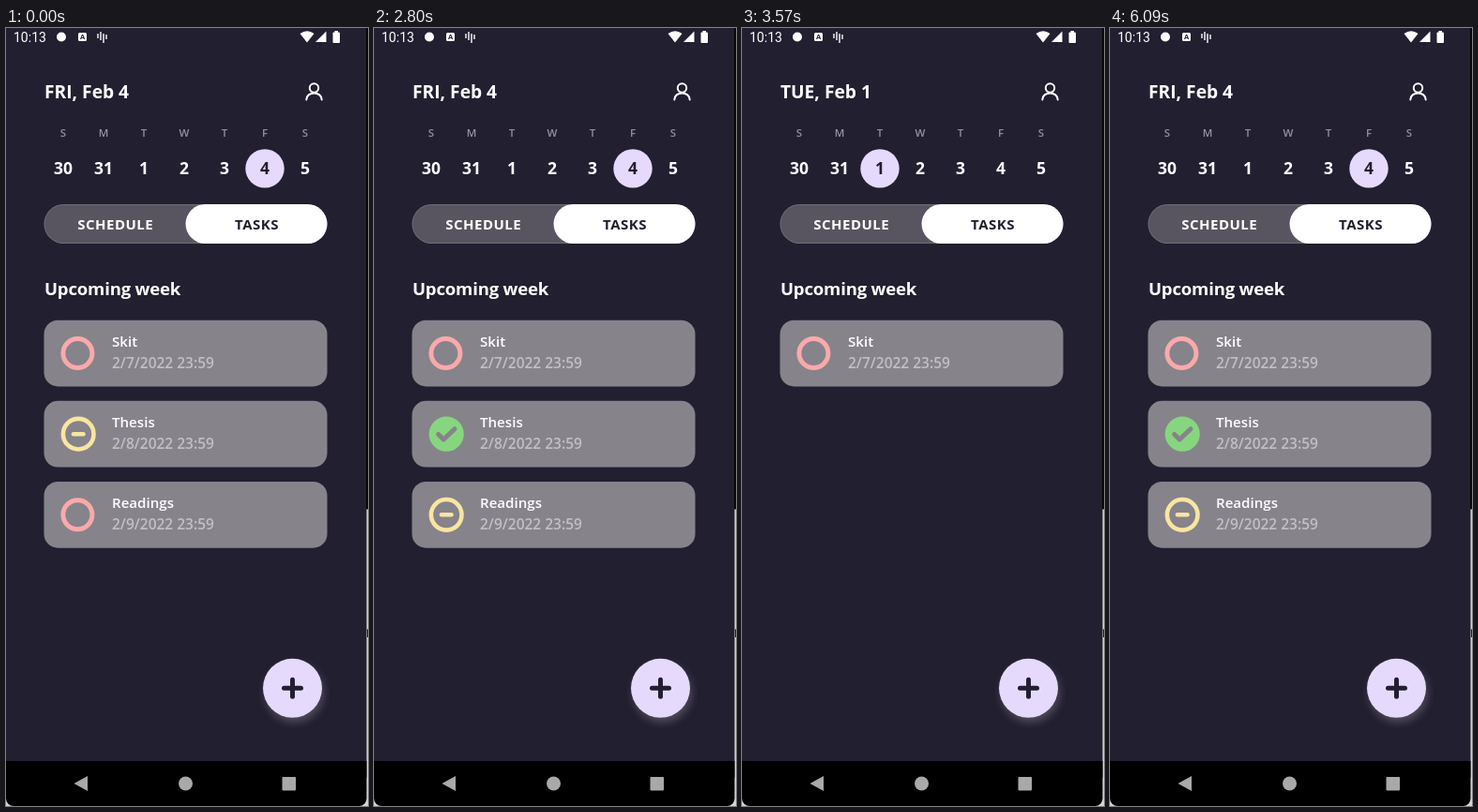
These frames come from a looping animation (386 by 830 pixels, 6.16 s). An HTML page with a canvas:

```html
<!DOCTYPE html>
<html lang="en">
<head>
<meta charset="utf-8">
<title>Task planner</title>
<style>
html, body { margin: 0; width: 100%; height: 100%; overflow: hidden; background: #221f30; }
canvas { display: block; width: 386px; height: 830px; }
</style>
</head>
<body>
<canvas id="stage"></canvas>
<script>
const W = 386, H = 830, LOOP = 6160, STEP = 70;
const BG = '#221f30', CARD = '#86838b', LILAC = '#e6dafc', GREY = '#a9a9a9';
const RED = [249, 169, 169], YELLOW = [248, 229, 160], GREEN = [134, 214, 128];
const SANS = '"Open Sans", "Noto Sans", sans-serif';

const canvas = document.getElementById('stage');
const dpr = window.devicePixelRatio || 1;
canvas.width = W * dpr;
canvas.height = H * dpr;
const c = canvas.getContext('2d');
c.scale(dpr, dpr);

const clamp = v => Math.max(0, Math.min(1, v));
const ramp = (t, a, b) => clamp((t - a) / (b - a));
const ease = p => p * p * (3 - 2 * p);
const mix = (a, b, p) => `rgb(${a.map((v, i) => Math.round(v + (b[i] - v) * p))})`;

function text(str, x, y, size, weight, color, align = 'left', spacing = 0, family = SANS) {
  c.font = `${weight} ${size}px ${family}`;
  c.letterSpacing = spacing + 'px';
  c.textAlign = align;
  c.fillStyle = color;
  c.fillText(str, x, y);
}

function box(x, y, w, h, r, fill) {
  c.beginPath();
  c.roundRect(x, y, w, h, r);
  c.fillStyle = fill;
  c.fill();
}

function disc(x, y, r, fill) {
  c.beginPath();
  c.arc(x, y, r, 0, Math.PI * 2);
  c.fillStyle = fill;
  c.fill();
}

function ring(x, y, r, width, color) {
  c.beginPath();
  c.arc(x, y, r, 0, Math.PI * 2);
  c.lineWidth = width;
  c.strokeStyle = color;
  c.stroke();
}

function poly(points, fill) {
  c.beginPath();
  points.forEach(p => c.lineTo(...p));
  c.closePath();
  c.fillStyle = fill;
  c.fill();
}

function line(points, width, color) {
  c.beginPath();
  points.forEach(p => c.lineTo(...p));
  c.lineWidth = width;
  c.lineCap = c.lineJoin = 'round';
  c.strokeStyle = color;
  c.stroke();
}

function statusBar() {
  text('10:13', 8, 14.5, 14, 400, '#fff', 'left', 0, 'Roboto, sans-serif');
  disc(59, 9.5, 5, '#fff');
  box(77, 5, 9, 9, 1.5, '#fff');
  text('A', 81.5, 12.3, 7.5, 700, BG, 'center');
  [[98, 6, 5], [101, 4, 9], [104, 6, 10], [107, 7, 5]]
    .forEach(([x, y, h]) => box(x - 0.7, y, 1.4, h, 0.5, '#fff'));
  c.beginPath();
  c.moveTo(321, 15.5);
  c.lineTo(313.5, 6);
  c.quadraticCurveTo(321, 0.5, 328.5, 6);
  c.closePath();
  c.fillStyle = '#fff';
  c.fill();
  poly([[330, 15], [341.5, 15], [341.5, 3.5]], '#fff');
  box(348.5, 4.5, 7.5, 11.5, 1, '#fff');
  box(350.5, 3, 3.5, 2, 0, '#fff');
}

function header(tuesday) {
  text(tuesday ? 'TUE, Feb 1' : 'FRI, Feb 4', 41, 75, 19.2, 700, '#fff');
  ring(328.5, 64, 4.7, 2, '#fff');
  c.beginPath();
  c.moveTo(320.3, 76.5);
  c.bezierCurveTo(320.8, 67, 336.2, 67, 336.7, 76.5);
  c.lineCap = 'round';
  c.stroke();

  const active = tuesday ? 2 : 5;
  ['30', '31', '1', '2', '3', '4', '5'].forEach((day, i) => {
    const x = 61 + i * 43;
    text('SMTWTFS'[i], x, 116, 11.5, 600, '#95929d', 'center');
    if (i === active) disc(x, 149.9, 20.7, LILAC);
    text(day, x, 156.3, 17.5, 700, i === active ? BG : '#fff', 'center');
  });
}

function tabs() {
  box(40.5, 188, 302, 42, 21, '#777480');
  box(41.3, 188.8, 300.4, 40.4, 20.2, '#585561');
  box(191.5, 188, 151, 42, 21, '#fff');
  text('SCHEDULE', 116.7, 214.6, 15, 700, '#fff', 'center', 0.5);
  text('TASKS', 267.5, 214.6, 15, 700, BG, 'center', 0.5);
}

// state: 0 open, 1 in progress, 2 done; fractions are in between
function taskIcon(y, state) {
  const started = clamp(state), done = clamp(state - 1);
  const x = 76.4 + 0.8 * started;
  const fill = clamp(done * 1.6), tick = ramp(done, 0.5, 1);
  const color = done ? mix(YELLOW, GREEN, fill) : mix(RED, YELLOW, started);
  const outer = 18 + 0.6 * started;
  const width = 5 - 0.4 * started + 14 * fill;
  if (fill >= 1) disc(x, y, outer, color);
  else ring(x, y, outer - width / 2, width, color);
  if (started && fill < 1) {
    const half = 5.3 * ease(started) * (1 - fill);
    line([[x - half, y], [x + half, y]], 4.5 * started, color);
  }
  if (tick) {
    const a = clamp(tick * 3), b = ramp(tick, 0.33, 1);
    const points = [[x - 8.6, y + 0.2], [x - 8.6 + 5.6 * a, y + 0.2 + 5.6 * a]];
    if (b) points.push([x - 3 + 11.8 * b, y + 5.8 - 11.3 * b]);
    line(points, 5, CARD);
  }
}

function task(i, name, state) {
  const y = 311.7 + i * 86.1;
  box(40.5, y, 302, 70.8, 15, CARD);
  taskIcon(y + 35.4, state);
  text(name, 113, y + 27.8, 15.1, 600, '#fff');
  text(`2/${7 + i}/2022 23:59`, 113, y + 50.8, 15.5, 600, '#c1bfc4');
}

function fade(t, start, mid, end) {
  return t < mid ? 1 - ramp(t, start, mid) : ramp(t, mid, end);
}

function list(t) {
  text('Upcoming week', 41, 284.5, 18.6, 700, '#fff', 'left', -0.2);
  task(0, 'Skit', 0);
  if (t < 3400 || t >= 4470) {
    task(1, 'Thesis', 1 + ramp(t, 1830, 2800));
    task(2, 'Readings', ramp(t, 1190, 1820));
  }
  const alpha = fade(t, 3220, 3400, 3570) * fade(t, 4340, 4470, 4620);
  if (alpha < 1) {
    c.globalAlpha = 1 - alpha;
    box(30, 255, 330, 310, 0, BG);
    c.globalAlpha = 1;
  }
}

function addButton() {
  c.save();
  c.shadowColor = 'rgba(150, 145, 160, 0.4)';
  c.shadowBlur = 8 * dpr;
  c.shadowOffsetX = 2 * dpr;
  c.shadowOffsetY = 5 * dpr;
  disc(305.5, 704.3, 31.5, LILAC);
  c.restore();
  line([[296.5, 704.3], [314.5, 704.3]], 5, BG);
  line([[305.5, 695.3], [305.5, 713.3]], 5, BG);
}

function navBar() {
  box(0, 782, 384.5, 48, [0, 0, 8, 8], '#000');
  poly([[72.5, 806], [87, 798], [87, 814]], GREY);
  disc(191.5, 806, 7.5, GREY);
  box(294.5, 799, 14.5, 14.5, 1, GREY);
}

function backdrop() {
  box(0, 0, W, H, 0, '#d4d4d6');
  box(0, 0, 384.5, 800, 0, BG);
  box(384, 0, 2, 513, 0, '#08070c');
  box(384.5, 512, 1.5, 1.5, 0, '#000');
  box(384.5, 641.5, 1.5, 1, 0, '#222');
  box(385, 642, 1, 8, 0, '#222');
}

function draw(now) {
  const t = Math.floor((now % LOOP) / STEP) * STEP;
  backdrop();
  statusBar();
  header(t >= 3220 && t < 4200);
  tabs();
  list(t);
  addButton();
  navBar();
}

let begin;
function tick(now) {
  begin ??= now;
  draw(Math.max(0, now - begin));
  requestAnimationFrame(tick);
}
draw(0);
requestAnimationFrame(tick);
</script>
</body>
</html>
```
